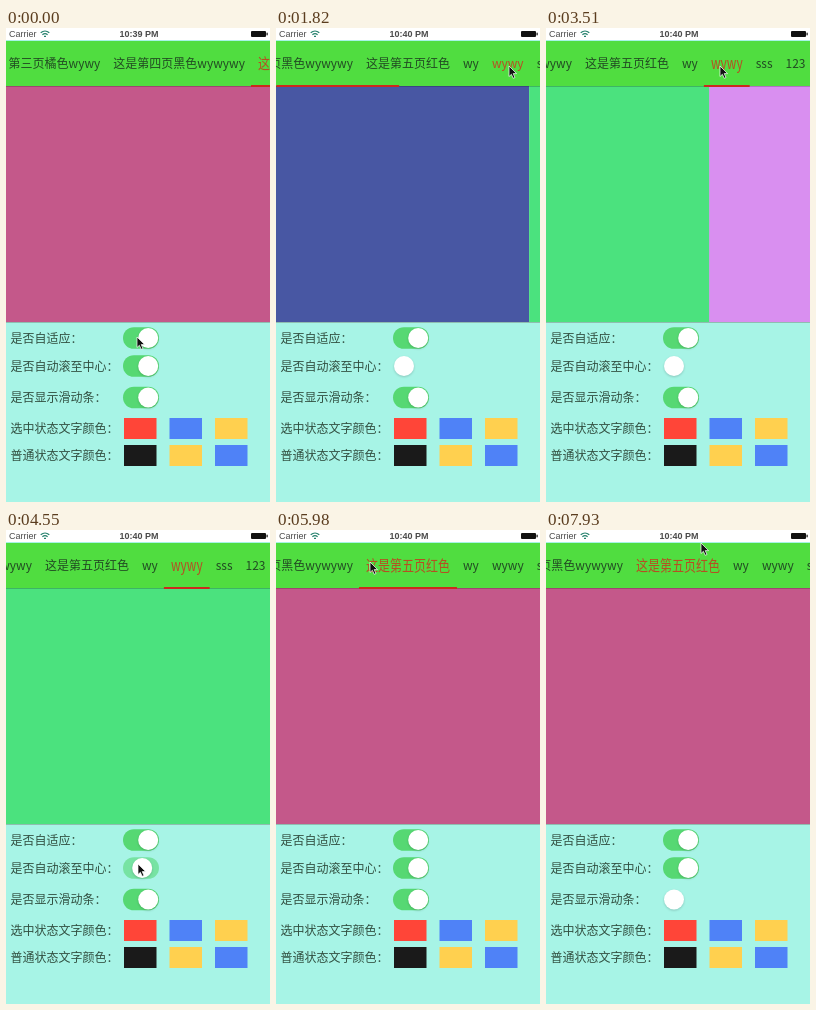
Write an HTML page that moves like this. It is 264 px wide and 474 px high and loops after 8000 ms.

```html
<!DOCTYPE html>
<html lang="zh">
<head>
<meta charset="utf-8">
<title>Tab bar demo</title>
<style>
html, body { margin: 0; width: 100%; height: 100%; overflow: hidden; background: #a7f4e6; }
svg { display: block; width: 264px; height: 474px; }
text { font: 300 12px "Noto Sans CJK SC Light", "Noto Sans CJK SC", "Noto Sans CJK", sans-serif; fill: #172b1c; fill-opacity: .82; white-space: pre; }
.status text { font: 9px "Liberation Sans", sans-serif; fill: #222; }
.status .clock { font-weight: bold; text-anchor: middle; }
.knob { fill: #fff; filter: drop-shadow(0 1px 1px rgba(0, 0, 0, .18)); }
</style>
</head>
<body>
<svg viewBox="0 0 264 474">
  <rect width="264" height="474" fill="#a7f4e6"/>
  <g id="panel"></g>
  <rect id="left" y="58" width="264" height="236"/>
  <rect id="right" y="58" width="264" height="236"/>
  <path d="M0 294.5H264" stroke="#8fbdb0"/>
  <rect y="13" width="264" height="45" fill="#50dd40"/>
  <path d="M0 58.5H264" stroke="#000" stroke-opacity=".2"/>
  <g id="tabs"><rect id="bar" y="57" height="2" fill="#cc2a1c"/></g>
  <g class="status">
    <rect width="264" height="12" fill="#fff"/>
    <text x="3" y="9">Carrier</text>
    <g fill="none" stroke="#23806c" stroke-width="1.2">
      <path d="M34.7 4.8Q39 1.2 43.3 4.8M36.4 6.7Q39 4.4 41.6 6.7"/>
      <path d="M38 8.3H40"/>
    </g>
    <text id="clock" class="clock" x="133" y="9"></text>
    <rect x="245" y="3" width="15" height="6" rx="1" fill="#111"/>
    <rect x="260.5" y="4.7" width="1.2" height="2.6" fill="#111"/>
  </g>
  <path id="pointer" d="M0 0V10.5L2.4 8.3L4.2 12.3L6 11.5L4.2 7.6H7.6Z" fill="#111" stroke="#fff" stroke-width=".7"/>
</svg>
<script>
const LOOP = 8000, STEP = 130, MOVE = 260, SLIDE = 385, BAR = 205, GAP = 13;
const $ = id => document.getElementById(id);
const set = (el, attrs) => { for (const k in attrs) el.setAttribute(k, attrs[k]); };

function add(parent, tag, attrs, text = "") {
  const el = document.createElementNS("http://www.w3.org/2000/svg", tag);
  set(el, attrs);
  el.textContent = text;
  return parent.appendChild(el);
}

// Tabs are laid out by text width, with the third one centred at scroll 0
const tabs = [
  ["第三页橘色wywy", "#f79a3c"],
  ["这是第四页黑色wywywy", "#4857a3"],
  ["这是第五页红色", "#c4588a"],
  ["wy", "#aee3a0"],
  ["wywy", "#4be27e"],
  ["sss", "#d98ff0"],
  ["123", "#f3d26b"]
].map(([label, color]) => ({ color, el: add($("tabs"), "text", { y: 40 }, label) }));

let edge = 0;
for (const tab of tabs) {
  tab.w = tab.el.getComputedTextLength();
  tab.x = edge;
  edge += tab.w + GAP;
}
const shift = 132 - tabs[2].x - tabs[2].w / 2;
for (const tab of tabs) {
  tab.x += shift;
  set(tab.el, { x: tab.x });
}

// Settings panel
const rows = [["是否自适应：", 310], ["是否自动滚至中心：", 338], ["是否显示滑动条：", 369.5]];
const switches = rows.map(([label, y]) => {
  add($("panel"), "text", { x: 4.5, y: y + 4.5 }, label);
  return {
    track: add($("panel"), "rect", { x: 117, y: y - 10.8, width: 36, height: 21.6, rx: 10.8, fill: "#56d873" }),
    knob: add($("panel"), "circle", { class: "knob", cy: y, r: 10 })
  };
});

const red = "#ff4538", blue = "#4f82f7", yellow = "#ffd04f", black = "#1a1a1a";
[["选中状态文字颜色：", red, blue, yellow], ["普通状态文字颜色：", black, yellow, blue]].forEach(([label, ...colors], row) => {
  const y = 390 + row * 27;
  add($("panel"), "text", { x: 4.5, y: y + 14.5 }, label);
  colors.forEach((fill, i) => add($("panel"), "rect", { x: 118 + i * 45.5, y, width: 32.5, height: 21, fill }));
});

// The pointer reaches x, y at time t; any action listed starts then
const script = [
  { t: -1000, x: 131, y: 309, page: 2, scroll: -162 },
  { t: 520, x: 132, y: 334, toggle: 1 },
  { t: 785, x: 170, y: 38, page: 1 },
  { t: 1170, x: 225, y: 38, scroll: 0 },
  { t: 1430, x: 63, y: 38 },
  { t: 1773, x: 233, y: 38, page: 4 },
  { t: 2255, x: 261, y: 38, page: 5 },
  { t: 2730, x: 225, y: 38, scroll: 51 },
  { t: 2990, x: 174, y: 38 },
  { t: 3287, x: 174, y: 38, page: 4 },
  { t: 4400, x: 132, y: 334, toggle: 1 },
  { t: 5125, x: 139, y: 39, page: 3, scroll: 57 },
  { t: 5595, x: 94, y: 32, page: 2, scroll: 0 },
  { t: 7150, x: 131, y: 366, toggle: 2 },
  { t: 7850, x: 155, y: 13 }
];

const ramp = (t, start, span) => Math.min(1, Math.max(0, (t - start) / span));
const smooth = p => p * p * (3 - 2 * p);
const mix = (a, b, p) => a + (b - a) * p;

// Latest change of a value: where from, where to, since when
function change(key, t) {
  const done = script.filter(e => key in e && e.t <= t);
  const now = done[done.length - 1], before = done[done.length - 2] || now;
  return { from: before[key], to: now[key], start: now.t };
}

function drawPages({ from, to, start }, t) {
  const dir = Math.sign(to - from) || 1;
  const x = -264 * dir * smooth(ramp(t, start, SLIDE));
  set($("left"), { x, fill: tabs[from].color });
  set($("right"), { x: x + 264 * dir, fill: tabs[to].color });
}

function drawTabs({ from, to, start }, t) {
  const p = ramp(t, start, BAR), a = tabs[from], b = tabs[to];
  const s = change("scroll", t);
  const offset = mix(s.from, s.to, smooth(ramp(t, s.start, MOVE)));
  set($("tabs"), { transform: `translate(${-offset} 0)` });
  set($("bar"), { x: mix(a.x, b.x, p) - 7, width: mix(a.w, b.w, p) + 14 });
  tabs.forEach((tab, i) => {
    const grow = i === to ? 1 + 0.25 * p : 1;
    tab.el.style.fill = i === to ? "#cd301c" : "";
    set(tab.el, { transform: `translate(0 36) scale(1 ${grow}) translate(0 -36)` });
  });
}

function drawSwitches(t) {
  switches.forEach(({ track, knob }, i) => {
    const on = script.filter(e => e.toggle === i)
      .reduce((v, e, n) => v + (n % 2 ? 1 : -1) * ramp(t, e.t, MOVE), 1);
    set(track, { opacity: on });
    set(knob, { cx: mix(128, 142.2, on) });
    if (i === 2) set($("bar"), { visibility: on > 0 ? "visible" : "hidden" });
  });
}

function drawPointer(t) {
  const i = script.findIndex(e => e.t > t);
  const b = i < 0 ? script[script.length - 1] : script[i];
  const a = i < 0 ? b : script[i - 1];
  const leave = Math.max(a.t, b.t - MOVE);
  const p = smooth(ramp(t, leave, b.t - leave));
  set($("pointer"), { transform: `translate(${mix(a.x, b.x, p)} ${mix(a.y, b.y, p)})` });
}

function draw(t) {
  const page = change("page", t);
  drawPages(page, t);
  drawTabs(page, t);
  drawSwitches(t);
  drawPointer(t);
  $("clock").textContent = t < 780 ? "10:39 PM" : "10:40 PM";
}

// The screen refreshes in fixed steps
const origin = performance.now();
function tick() {
  const t = (performance.now() - origin) % LOOP;
  draw(Math.floor(t / STEP) * STEP);
  requestAnimationFrame(tick);
}
tick();
</script>
</body>
</html>
```
